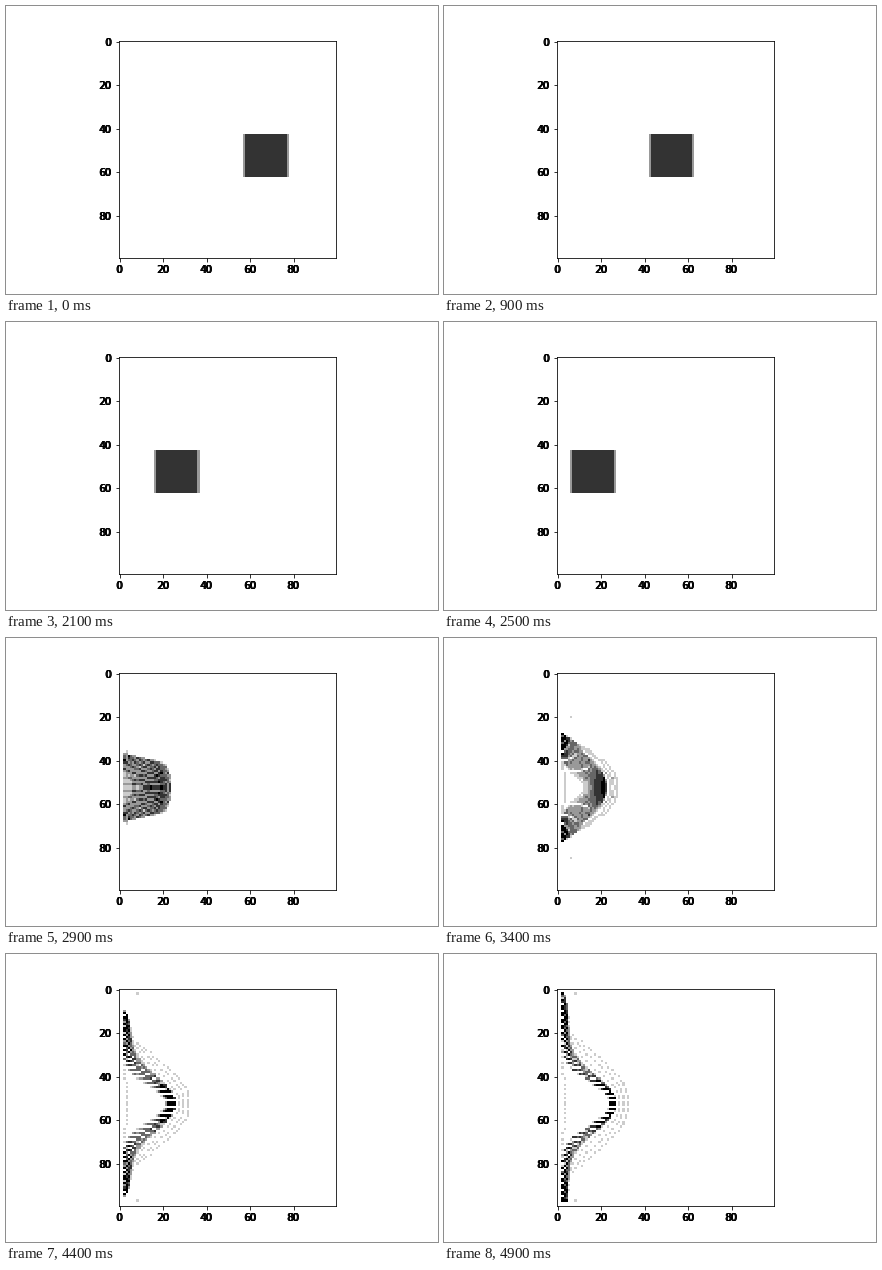
Animation of 432 by 288 pixels, one loop 5000 ms. Source, as a matplotlib script:

```python
import matplotlib.pyplot as plt
import numpy as np
from matplotlib.animation import FuncAnimation

FRAMES, INTERVAL = 50, 100
GRID, SIDE = 100, 40          # image cells and particles per side of the block
CENTER, WALL = 53.0, 2.2
CONTACT, SPLASH = 26.4, 29.0

plt.rcParams.update({"font.family": "DejaVu Sans", "font.size": 10})

layer, row = np.meshgrid(np.arange(SIDE), np.arange(SIDE))
depth = layer / (SIDE - 1)                    # 0 at the wall side, 1 at the back
offset = (row - (SIDE - 1) / 2) / (SIDE / 2)  # -1 .. 1 across the block
side, reach = np.sign(offset), np.abs(offset)
skin, halo = layer < 1, layer > 36
main = np.clip((layer - 1) / 35, 0, 1)
shell = np.clip((layer - 36) / 3, 0, 1)
strays = skin & ((row == 0) | (row == SIDE - 1))


def mix(a, b, w):
    return a + (b - a) * w


def smoothstep(u):
    u = np.clip(u, 0, 1)
    return u * u * (3 - 2 * u)


def block(t, back, tip):
    """Falling block, squashed against the wall after contact."""
    left = 57.88 - 1.48 * t - 0.0223 * t * t
    right = left + (SIDE - 1) / 2
    if t > CONTACT:
        left, right = max(left, WALL), max(right, back)
    return mix(left, right, depth), offset * mix(tip, 10, depth)


def splash(s, back, tip):
    """Bell-shaped sheets that rebound, with jets running along the wall."""
    front = 21.3 + 0.28 * s
    inner = front - 16 * np.exp(-s / 11)
    apex = mix(inner, front, main ** 0.6)
    width = mix(6 + 0.35 * s, 17, main)
    apex = np.where(halo, mix(front, back, shell), apex)
    width = np.where(halo, mix(17, 16 + 0.43 * s, shell), width)
    apex = np.where(skin, 4, apex)

    foot = max(10, 11 + 1.2 * s - 0.02 * s * s)
    dy = foot * reach * (1 + 0.08 * shell)
    dy = dy + (tip - foot) * (1 - depth) ** 0.25 * (1 - shell) * reach ** 1.5
    base = WALL + 3 * depth
    x = base + (apex - base) * np.exp(-(dy / width) ** (2.2 + 0.4 * shell))
    return x, side * dy


def particles(t):
    s = t - SPLASH
    back = 23.7 + 0.92 * s - 0.0245 * s * s
    tip = max(10, 15.9 + 1.85 * s)
    x, dy = block(t, back, tip)
    if t > CONTACT:
        sx, sdy = splash(s, back, tip)
        w = smoothstep((t - CONTACT) / 6)
        x, dy = mix(x, sx, w), mix(dy, sdy, w)
        x = np.where(strays, 3.6 + 1.2 * np.sqrt(max(s, 0)), x)
        dy = np.where(strays, side * (16.5 + 3.2 * s), dy)
    return x, np.clip(CENTER + dy, 2.2, 97.8)


def picture(t):
    x, y = particles(t)
    bounds = [[0, GRID], [0, GRID]]
    count, _, _ = np.histogram2d(y.ravel(), x.ravel(), bins=GRID, range=bounds)
    return np.clip(1 - 0.2 * count, 0, 1)


fig = plt.figure(figsize=(6, 4), dpi=72, facecolor="white")
fig.subplots_adjust(left=0.125, right=0.9, bottom=0.125, top=0.88)
ax = fig.add_subplot()
image = ax.imshow(picture(0), cmap="gray", vmin=0, vmax=1, interpolation="nearest")

# Extra tick labels, some a pixel to the left, give the heavy doubled digits.
for k, shift in enumerate((0, -1, -1)):
    copy = fig.add_axes([0.125 + shift / 432, 0.125, 0.775, 0.755],
                        label=f"copy{k}", facecolor="none")
    copy.set(xlim=ax.get_xlim(), ylim=ax.get_ylim(), aspect="equal",
             xticks=range(0, GRID, 20), yticks=range(0, GRID, 20))
    copy.spines[:].set_visible(False)
    copy.tick_params(color="none")


def update(frame):
    image.set_data(picture(frame))
    return [image]


anim = FuncAnimation(fig, update, frames=FRAMES, interval=INTERVAL,
                     repeat=True, repeat_delay=0)
plt.show()
```
